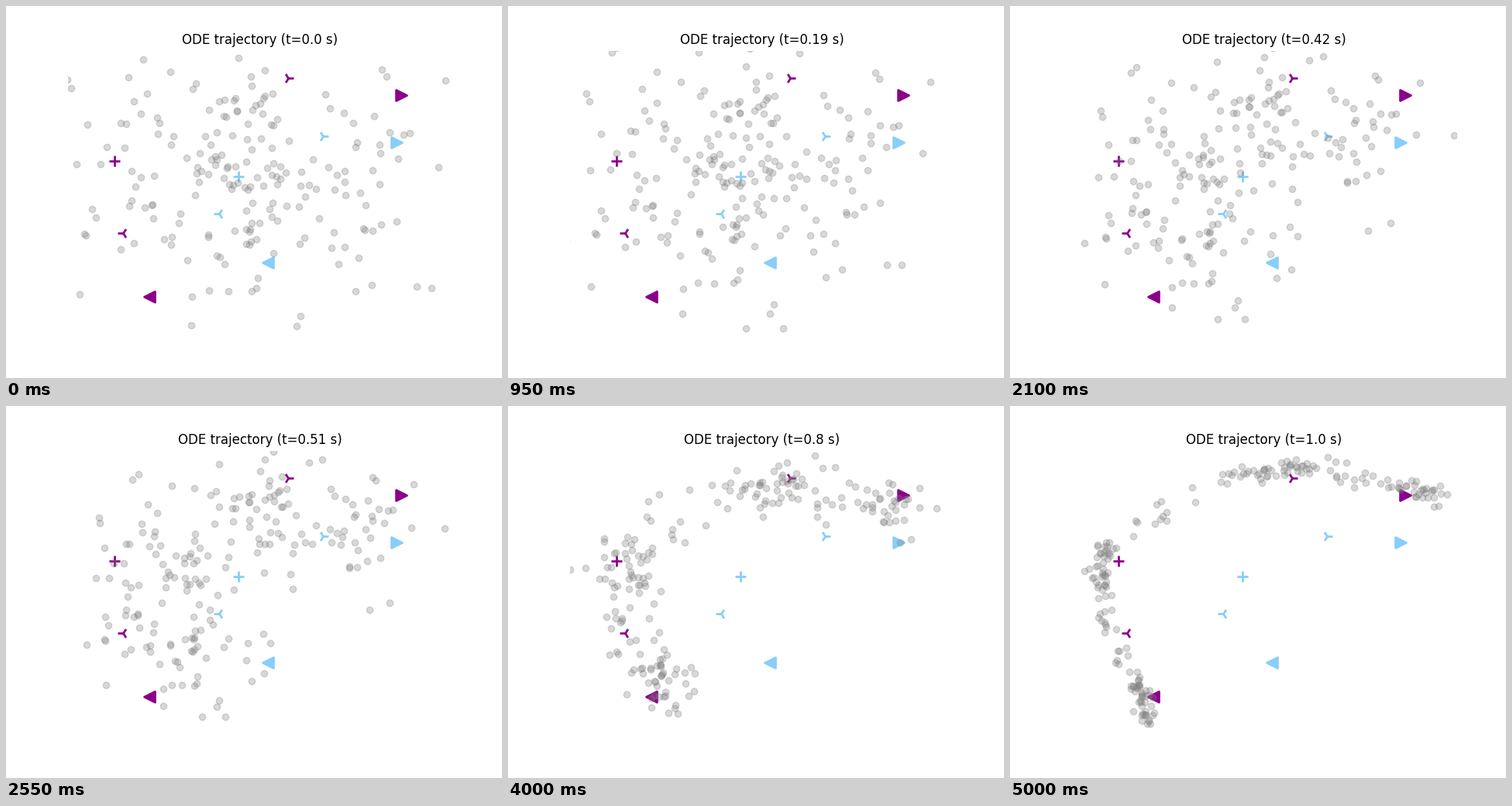
A matplotlib script that plays this animation: 640x480 px, repeating every 5.55 s.

```python
import numpy as np
import matplotlib.pyplot as plt
from matplotlib.animation import FuncAnimation

STEPS = 100      # integration steps from t=0 to t=1
HOLD = 10        # extra frames at the end
INTERVAL = 50
COUNT = 210

# Source: one wide Gaussian, in stage pixels with y pointing down.
MEAN = np.array([318, 226])
SIGMA = np.array([123, 93])

# Target: small Gaussians along an arc, with equal mass between key points.
KEYS = np.array([
    (177, 400), (171, 372), (162, 345), (124, 270), (117, 222), (126, 185),
    (280, 95), (350, 84), (420, 84), (480, 102), (550, 116),
])
ARC_COUNT = 41
ARC_SIGMA = 8
HEAD_START = 0.22  # how early a point leans towards its part of the arc

# Marker, start and end of the highlighted pairs.
PAIRS = [
    ("+", (300, 220), (140, 200)),
    ("3", (275, 268), (151, 293)),
    ("4", (409, 168), (364, 93)),
    ("<", (338, 331), (185, 375)),
    (">", (504, 176), (510, 115)),
]


def arc_centers():
    along = np.linspace(0, len(KEYS) - 1, ARC_COUNT)
    index = np.arange(len(KEYS))
    return np.column_stack([np.interp(along, index, axis) for axis in KEYS.T])


def bridge(points, centers, t):
    """Offset of each point from each moving Gaussian, and its variance."""
    offset = points[:, None] - ((1 - t) * MEAN + t * centers)
    return offset, (1 - t)**2 * SIGMA**2 + t**2 * ARC_SIGMA**2


def velocity(points, centers, t):
    """Flow that carries the source onto the arc."""
    offset, var = bridge(points, centers, HEAD_START + (1 - HEAD_START) * t)
    score = -(offset**2 / var).sum(axis=2) / 2
    share = np.exp(score - score.max(axis=1, keepdims=True))
    share /= share.sum(axis=1, keepdims=True)

    offset, var = bridge(points, centers, t)
    rate = (t * ARC_SIGMA**2 - (1 - t) * SIGMA**2) / var
    return (share[..., None] * (centers - MEAN + rate * offset)).sum(axis=1)


def integrate(points):
    centers = arc_centers()
    path = [points]
    for i in range(STEPS):
        path.append(path[-1] + velocity(path[-1], centers, i / STEPS) / STEPS)
    return path


rng = np.random.default_rng(7)
path = integrate(rng.normal(MEAN, SIGMA, (COUNT, 2)))

fig, ax = plt.subplots(figsize=(6.4, 4.8), dpi=100)
ax.set_xlim(80, 576)
ax.set_ylim(427.2, 57.6)
ax.axis("off")
for marker, start, end in PAIRS:
    for spot, color in ((start, "lightskyblue"), (end, "darkmagenta")):
        ax.scatter(*spot, s=100, marker=marker, color=color, linewidth=2)
dots = ax.scatter(*path[0].T, color="gray", alpha=0.3)
title = ax.set_title("ODE trajectory (t=0.0 s)")


def update(frame):
    step = min(frame, STEPS)
    dots.set_offsets(path[step])
    title.set_text(f"ODE trajectory (t={step / STEPS} s)")
    return dots, title


anim = FuncAnimation(fig, update, frames=STEPS + 1 + HOLD,
                     interval=INTERVAL, repeat=True, repeat_delay=0)
plt.show()
```
